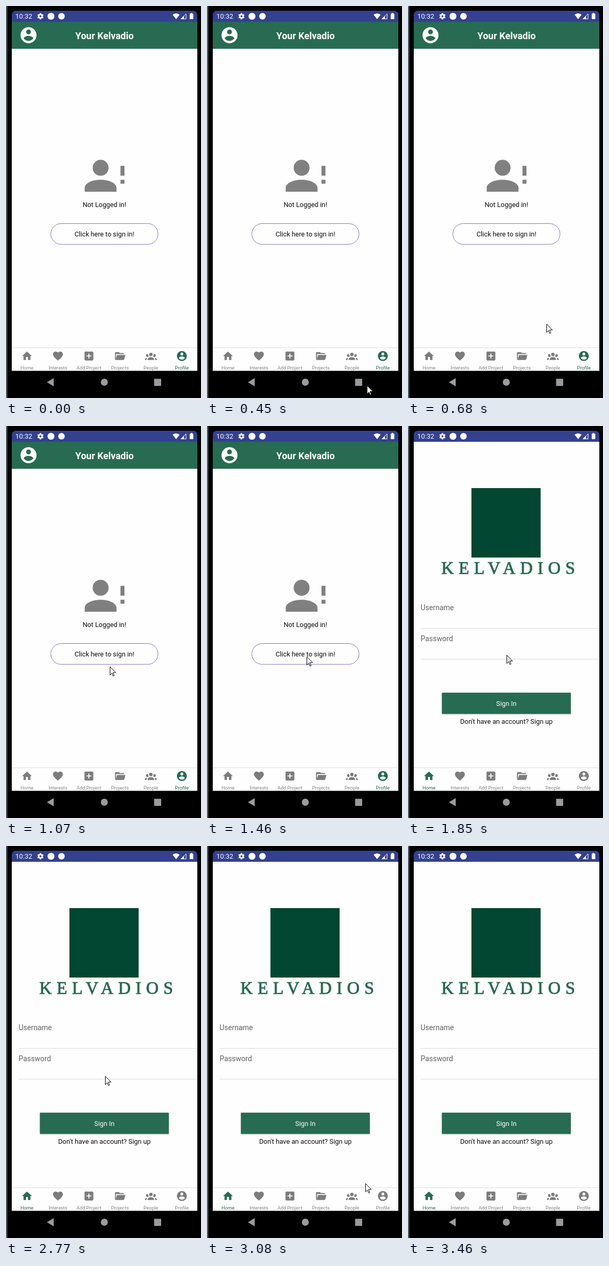
Animation, 372 px wide and 745 px high, one loop 3.92 s. Source, as an HTML page:

```html
<!DOCTYPE html>
<html lang="en">
<head>
<meta charset="utf-8">
<title>Sign-in flow</title>
<style>
  html, body { margin: 0; width: 100%; height: 100%; overflow: hidden; background: #000; }
  svg { display: block; width: 100vw; height: 100vh; }
  text { font-family: Roboto, Arial, sans-serif; font-size: 12.8px; fill: #0c0c0c; }
  .mid { text-anchor: middle; }
  .title { font-size: 18px; font-weight: 700; fill: #fff; }
  .field { font-size: 14px; fill: #626262; }
  .light { fill: #fff; }
  .clock { font-size: 13px; }
  .word { font-family: "Liberation Serif", "Times New Roman", serif; font-size: 33px;
          letter-spacing: 9.2px; fill: #266b51; stroke: #266b51; stroke-width: .9px; }
  .tab { fill: #7c7c7c; }
  .tab text { font-size: 9.2px; fill: #858585; }
  .tab.on, .tab.on text { fill: #266b51; }
</style>
</head>
<body>
<svg viewBox="0 0 372 745" preserveAspectRatio="none">
  <defs>
    <path id="account" d="M12 2C6.48 2 2 6.48 2 12s4.48 10 10 10 10-4.48 10-10S17.52 2 12 2zm0 3c1.66 0 3 1.34 3 3s-1.34 3-3 3-3-1.34-3-3 1.34-3 3-3zm0 14.2c-2.5 0-4.71-1.28-6-3.22.03-1.99 4-3.08 6-3.08 1.99 0 5.97 1.09 6 3.08-1.29 1.94-3.5 3.22-6 3.22z"/>
    <path id="home" d="M10 20v-6h4v6h5v-8h3L12 3 2 12h3v8z"/>
    <path id="heart" d="M12 21.35l-1.45-1.32C5.4 15.36 2 12.28 2 8.5 2 5.42 4.42 3 7.5 3c1.74 0 3.41.81 4.5 2.09C13.09 3.81 14.76 3 16.5 3 19.58 3 22 5.42 22 8.5c0 3.78-3.4 6.86-8.55 11.54z"/>
    <path id="add" d="M19 3H5c-1.11 0-2 .9-2 2v14c0 1.1.89 2 2 2h14c1.1 0 2-.9 2-2V5c0-1.1-.9-2-2-2zm-2 10h-4v4h-2v-4H7v-2h4V7h2v4h4z"/>
    <path id="folder" d="M19 20H4c-1.11 0-2-.9-2-2V6c0-1.11.89-2 2-2h6l2 2h7a2 2 0 0 1 2 2H4v10l2.14-8h17.07l-2.28 8.5c-.23.87-1.01 1.5-1.93 1.5z"/>
    <path id="group" d="M12 5.5a3.5 3.5 0 0 1 0 7 3.5 3.5 0 0 1 0-7M5 8c.56 0 1.08.15 1.53.42-.15 1.43.27 2.85 1.13 3.96C7.16 13.34 6.16 14 5 14a3 3 0 0 1 0-6m14 0a3 3 0 0 1 0 6c-1.16 0-2.16-.66-2.66-1.62a5.54 5.54 0 0 0 1.13-3.96c.45-.27.97-.42 1.53-.42M5.5 18.25c0-2.07 2.91-3.75 6.5-3.75s6.5 1.68 6.5 3.75V20h-13zM0 20v-1.5c0-1.39 1.89-2.56 4.45-2.9-.59.68-.95 1.62-.95 2.65V20zm24 0h-3.5v-1.75c0-1.03-.36-1.97-.95-2.65 2.56.34 4.45 1.51 4.45 2.9z"/>
    <path id="alert" d="M10 4a4 4 0 0 1 0 8 4 4 0 0 1 0-8m0 10c4.42 0 8 1.79 8 4v2H2v-2c0-2.21 3.58-4 8-4m10-2V7h2v5zm0 4v-2h2v2z"/>
  </defs>

  <rect width="372" height="745"/>
  <rect width="2.5" height="745" fill="#535a64"/>
  <rect x="11" y="30" width="354" height="663.4" fill="#fefefe"/>
  <path d="M11 30V17a8 8 0 0 1 8-8H357a8 8 0 0 1 8 8V30z" fill="#33418f"/>

  <g fill="#fff">
    <text class="light clock" x="17.8" y="24.4">10:32</text>
    <g id="gear" transform="translate(65.7 19.5)"></g>
    <circle cx="85.8" cy="19.5" r="6.6"/>
    <circle cx="105.8" cy="19.5" r="6.2"/>
    <path d="M317.8 16.6Q324.5 11.4 331.2 16.6L324.5 25z"/>
    <path d="M333.8 24.6H343.5V14.9z" fill="none" stroke="#fff"/>
    <path d="M333.2 25L339.5 18.7V25z"/>
    <path d="M352.3 13.2h3v1.3h1.2q.8 0 .8.8v9q0 .8-.8.8h-5.2q-.8 0-.8-.8v-9q0-.8.8-.8h1z"/>
  </g>

  <g id="profile">
    <rect x="11" y="80" width="354" height="2" fill="#b5c9c1"/>
    <rect x="11" y="30" width="354" height="51" fill="#276b52"/>
    <use href="#account" fill="#fff" transform="translate(24.6 37.1) scale(1.53)"/>
    <text class="title mid" x="188" y="63">Your Kelvadio</text>
    <use href="#alert" fill="#808080" transform="translate(142.6 277.1) scale(3.79)"/>
    <text class="mid" x="187.7" y="382">Not Logged in!</text>
    <g id="button">
      <rect x="85.5" y="413.5" width="204.5" height="39.5" rx="19.75" fill="none" stroke="#6c67bf" stroke-width=".9"/>
      <text class="mid" x="187.7" y="438">Click here to sign in!</text>
    </g>
  </g>

  <g id="login">
    <rect x="121" y="118" width="132" height="132" fill="#024731"/>
    <text class="word" x="63.5" y="281">KELVADIOS</text>
    <text class="field" x="24" y="350">Username</text>
    <text class="field" x="24" y="408.7">Password</text>
    <path d="M24 384.6H365M24 443.2H365" stroke="#e0e0e0" stroke-width="1.3"/>
    <rect x="64.6" y="507.5" width="246.4" height="41" rx="1" fill="#bcc6c2"/>
    <rect x="64.6" y="506.8" width="246" height="40.2" rx="1" fill="#276b52"/>
    <text class="light mid" x="187.7" y="532">Sign In</text>
    <text class="mid" x="187.7" y="566">Don't have an account? Sign up</text>
  </g>

  <path d="M11 649.5H365" stroke="#dedede"/>
  <g id="tabs"></g>

  <g fill="#9b9b9b">
    <path d="M78 715L91 707.3V722.7z"/>
    <circle cx="187.5" cy="715" r="6.7"/>
    <rect x="282.5" y="708.5" width="13.5" height="13.5" rx="1"/>
  </g>

  <path id="cursor" d="M.5 .6V16.3L4.1 12.8 6.4 18.4 8.5 17.5 6.2 11.7H11.4z"
        fill="#fff" stroke="#000" stroke-linejoin="round"/>
</svg>
<script>
const LOOP = 3920, SWITCH = 1850;
const $ = id => document.getElementById(id);

const tabs = [["home", "Home"], ["heart", "Interests"], ["add", "Add Project"],
              ["folder", "Projects"], ["group", "People"], ["account", "Profile"]];
$("tabs").innerHTML = tabs.map(([icon, label], i) => {
  const x = 40 + 59.1 * i;
  return `<g class="tab"><use href="#${icon}" transform="translate(${x - 11.3} 653.9) scale(.94)"/>
    <text class="mid" x="${x}" y="690.6">${label}</text></g>`;
}).join("");
const tabNodes = [...$("tabs").children];

$("gear").innerHTML = '<circle r="3.2" fill="none" stroke="#fff" stroke-width="2.6"/>' +
  [0, 60, 120].map(a => `<path d="M-1.5 -6h3v2.6h-3zM-1.5 3.4h3V6h-3z" transform="rotate(${a})"/>`).join("");

const mix = (a, b, u) => a.map((v, i) => v + (b[i] - v) * u);
const smooth = u => u * u * (3 - 2 * u);
const easeOut = u => 1 - (1 - u) ** 2;

// The pointer moves in steps: each run has a start, an end, a step count and a place per step.
const runs = [
  { from: 450, to: 920, steps: 7,
    at: i => i < 3 ? mix([305, 721], [264, 604], i / 3) : mix([264, 604], [205, 475], (i - 3) / 3) },
  { from: 1000, to: 1460, steps: 7, at: i => mix([205, 475], [190, 438], easeOut((i + 1) / 7)) },
  { from: 1550, to: 1850, steps: 5, at: i => mix([190, 438], [188, 435], Math.min(1, (i + 1) / 2)) },
  { from: 2770, to: 3230, steps: 7, at: i => mix([189, 437], [342, 713], smooth(i / 6)) },
  { from: 3310, to: 3460, steps: 3, at: i => i < 2 ? mix([346, 725], [349, 736], i) : null }
];

function stepOf({ from, to, steps }, t) {
  let i = 0;
  while (i < steps - 1 && t >= Math.floor((from + (i + 1) * (to - from) / (steps - 1)) / 10) * 10) i++;
  return i;
}

function draw(t) {
  const run = runs.filter(r => t >= r.from).pop();
  const step = run ? stepOf(run, t) : 0;
  const place = run && run.at(step);
  $("cursor").style.display = place ? "" : "none";
  if (place) $("cursor").setAttribute("transform", `translate(${place.map(Math.round).join(" ")})`);

  const loggedOut = t < SWITCH;
  $("profile").style.display = loggedOut ? "" : "none";
  $("login").style.display = loggedOut ? "none" : "";
  $("button").setAttribute("opacity", run === runs[2] ? [1, 1, .93, .85, 1][step] : 1);
  tabNodes.forEach((node, i) => node.classList.toggle("on", i === (loggedOut ? 5 : 0)));
}

const start = performance.now();
function tick() {
  draw((performance.now() - start) % LOOP);
  requestAnimationFrame(tick);
}
tick();
</script>
</body>
</html>
```
